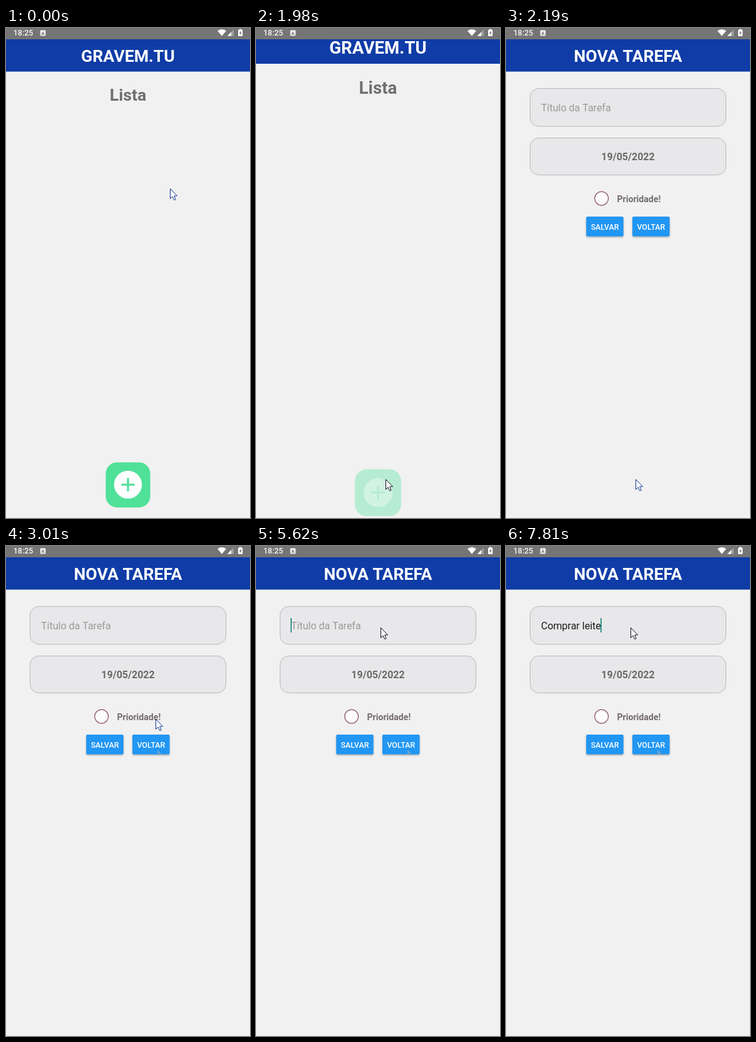
An HTML page with a canvas for the animation above (8000 ms loop, 390 by 782 pixels).

```html
<!DOCTYPE html>
<html lang="pt">
<head>
<meta charset="utf-8">
<style>
html, body { margin: 0; width: 100%; height: 100%; overflow: hidden; background: #f1f1f1; }
canvas { display: block; width: 390px; height: 782px; }
</style>
</head>
<body>
<canvas id="stage" width="390" height="782"></canvas>
<script>
const ctx = document.getElementById('stage').getContext('2d');
const LOOP = 8000, STEP = 70;
const PRESS = 1540, OPEN = 1980, FOCUS = 3700, TYPE = 5950;
const BG = '#f1f1f1', BLUE = '#0f3ca6', GREEN = '#50e199', GREY = '#757575';

// Pointer tip: time, x, y
const PATH = [
  [0, 262, 256], [830, 213, 647], [970, 206, 671], [1180, 207, 720],
  [2320, 207, 720], [2940, 242, 313], [3150, 234, 203], [3570, 199, 130]
];
// Typed text, start and time per letter
const BURSTS = [['Comprar', TYPE, 111], [' ', 7010, 1], ['leite', 7470, 85]];

const lerp = (a, b, k) => a + (b - a) * k;
const ramp = (t, from, to) => Math.min(1, Math.max(0, (t - from) / (to - from)));

function rect(x, y, w, h, color) {
  ctx.fillStyle = color;
  ctx.fillRect(x, y, w, h);
}

function paint(fill, stroke, width = 1) {
  ctx.fillStyle = fill;
  ctx.fill('evenodd');
  if (!stroke) return;
  ctx.strokeStyle = stroke;
  ctx.lineWidth = width;
  ctx.stroke();
}

function box(x, y, w, h, r, fill, stroke) {
  ctx.beginPath();
  ctx.roundRect(x, y, w, h, r);
  paint(fill, stroke);
}

function disc(x, y, r, fill, stroke) {
  ctx.beginPath();
  ctx.arc(x, y, r, 0, 2 * Math.PI);
  paint(fill, stroke, 1.2);
}

function poly(points, fill, stroke) {
  ctx.beginPath();
  for (let i = 0; i < points.length; i += 2) ctx.lineTo(points[i], points[i + 1]);
  ctx.closePath();
  paint(fill, stroke);
}

function text(str, x, y, size, weight, color, align = 'center') {
  ctx.font = `${weight} ${size}px Roboto, sans-serif`;
  ctx.textAlign = align;
  ctx.fillStyle = color;
  ctx.fillText(str, x, y);
}

function zoomed(scale, draw) {
  ctx.save();
  ctx.translate(195, 400);
  ctx.scale(scale, scale);
  ctx.translate(-195, -400);
  draw();
  ctx.restore();
}

function header(title) {
  rect(0, 18, 390, 764, BG);
  rect(0, 18, 390, 51.6, BLUE);
  text(title, 195, 54, 26.7, 700, '#fff');
}

function addButton(alpha) {
  const x = 195, y = 728.8, arm = 9.3, w = 1.65;
  ctx.globalAlpha = alpha;
  box(159.4, 693.2, 71.2, 72, 18, GREEN);
  // White disc with a plus-shaped hole
  ctx.beginPath();
  ctx.arc(x, y, 22.3, 0, 2 * Math.PI);
  ctx.moveTo(x + w, y - w);
  for (let i = 0; i < 4; i++) {
    const a = i * Math.PI / 2, corner = a + Math.PI / 4;
    ctx.arc(x + arm * Math.cos(a), y + arm * Math.sin(a), w, a - Math.PI / 2, a + Math.PI / 2);
    ctx.lineTo(x + w * Math.SQRT2 * Math.cos(corner), y + w * Math.SQRT2 * Math.sin(corner));
  }
  paint('#fff');
  ctx.globalAlpha = 1;
}

function listPage(t) {
  header('GRAVEM.TU');
  text('Lista', 195, 116, 26.7, 700, '#6f6f6f');
  addButton(t < OPEN ? lerp(1, 0.2, ramp(t, PRESS, 1650)) : 0.37);
}

function blueButton(label, x) {
  ctx.shadowColor = 'rgba(0,0,0,.3)';
  ctx.shadowBlur = 3;
  ctx.shadowOffsetY = 1.5;
  box(x, 301, 59.5, 31.5, 2, '#2196f3');
  ctx.shadowColor = 'transparent';
  text(label, x + 29.8, 321.7, 12.4, 500, '#fff');
}

function typed(t) {
  return BURSTS.map(([word, start, pace]) =>
    word.slice(0, Math.max(0, Math.floor((t - start) / pace) + 1))).join('');
}

function caretOn(t) {
  return t >= TYPE || (t >= FOCUS && (t - FOCUS) % 960 < 470);
}

function taskPage(t) {
  header('NOVA TAREFA');
  box(38.5, 96.5, 313, 60.5, 14, '#e8e8ea', '#b6b6ba');
  box(38.5, 175.5, 313, 59, 14, '#e8e8ea', '#b6b6ba');
  const str = typed(t);
  text(str || 'Título da Tarefa', 56, 132.8, 16, 400, str ? '#1c1c1c' : '#999', 'left');
  if (caretOn(t)) rect(55.4 + ctx.measureText(str).width, 115, 1.6, 23, '#0b8578');
  text('19/05/2022', 195, 211, 16, 700, '#6a6a6a');
  disc(152.7, 272, 10.9, '#fcfcfc', '#8c5760');
  text('Prioridade!', 177.5, 277.5, 14.1, 700, '#746c6c', 'left');
  blueButton('SALVAR', 128.2);
  blueButton('VOLTAR', 202);
  // Trace the pointer leaves on the button
  if (t >= 2940) poly([242, 325, 248.5, 331.5, 242, 331.5], '#6fa3cc');
}

function statusBar() {
  rect(0, 0, 390, 18, GREY);
  text('18:25', 11.8, 12.2, 12.4, 500, '#f6f6f6', 'left');
  box(54.7, 3.5, 8.6, 9, 1.2, BG);
  text('A', 59, 11, 8, 700, GREY);
  // Wi-Fi fan
  ctx.beginPath();
  ctx.moveTo(345, 12.8);
  ctx.lineTo(338, 4.6);
  ctx.quadraticCurveTo(345, -0.4, 352, 4.6);
  paint('#fff');
  // Signal strength
  poly([353.8, 12.8, 364, 12.8, 364, 2.6], '#9da39f');
  poly([353.8, 12.8, 360, 12.8, 360, 6.6], '#fff');
  // Charging battery
  box(371, 2.8, 7.2, 10.2, 1, '#fff');
  rect(373, 1.6, 3.2, 1.6, '#fff');
  poly([375.2, 4.2, 372.8, 8.6, 374.2, 8.6, 374.2, 11.6, 376.5, 7.2, 375.2, 7.2], GREY);
}

function tipAt(t) {
  const offset = t < OPEN ? 60 : 0;
  const q = Math.max(0, Math.floor((t - offset) / STEP) * STEP + offset);
  const next = PATH.findIndex(p => p[0] > q);
  const [t0, x0, y0] = PATH.at(next < 0 ? -1 : next - 1);
  const [t1, x1, y1] = PATH.at(next);
  const k = ramp(q, t0, t1) || 0;
  return [lerp(x0, x1, k), lerp(y0, y1, k)].map(v => Math.round(v) + 0.5);
}

function pointer(t) {
  const bluish = t < 900 || (t >= 2190 && t < 3220);
  ctx.save();
  ctx.translate(...tipAt(t));
  poly([0, 0, 0, 16, 3.5, 12.5, 6.3, 18.2, 8.6, 17.2, 6.2, 11.5, 11, 11.3],
    '#fff', bluish ? '#0c2f8a' : '#0b0b1c');
  ctx.restore();
}

function render(t) {
  // The page change advances in steps: the old page grows, the new one settles
  const step = Math.floor((t - OPEN) / STEP);
  if (step < 3) zoomed(step < 0 ? 1 : 1.038 + 0.005 * step, () => listPage(t));
  if (step > 0) zoomed(1 - 0.0175 * Math.max(0, 3 - step), () => taskPage(t));
  statusBar();
  pointer(t);
}

function tick(now) {
  render(now % LOOP);
  requestAnimationFrame(tick);
}
render(0);
requestAnimationFrame(tick);
</script>
</body>
</html>
```
